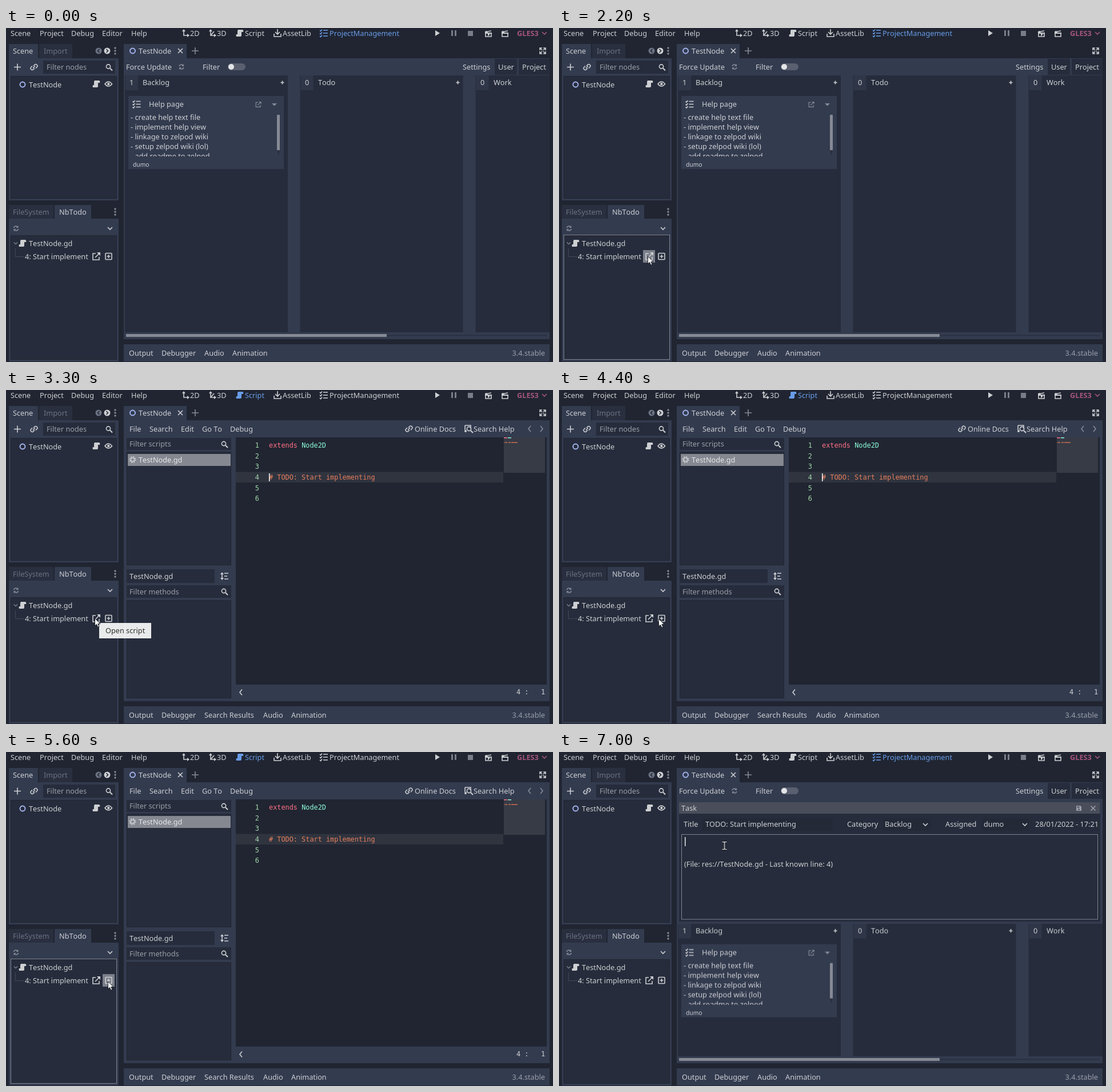
Animation of 957x585 px, one loop 8 s. Source, as an HTML page:

```html
<!DOCTYPE html>
<html lang="en">
<head>
<meta charset="utf-8">
<title>Editor todo list</title>
<style>
html, body { margin: 0; width: 100%; height: 100%; overflow: hidden; background: #202531; }
svg { display: block; color: #cdcfd2; }
text { font: 12.72px "Noto Sans", sans-serif; font-kerning: none; fill: currentColor; white-space: pre; }
.code text { font: 11.87px "DejaVu Sans Mono", monospace; }
.small { font-size: 10.3px; }
.bold { font-weight: 700; }
.end { text-anchor: end; }
.dim { color: #9a9fa9; }
.faint { color: #858a95; }
.off { color: #6b7282; }
.num { color: #a3d6a9; }
.base { fill: #333b4f; }
.well { fill: #262c3b; }
.tab { fill: #292f3e; }
.count { fill: #2f3648; }
.line { fill: none; stroke: currentColor; stroke-width: 1.6; }
.solid { fill: currentColor; }
.focus { fill: none; stroke: #7f8490; }

/* one loop is 8 s, so 100 ms = 1.25% */
.anim { animation: 8s step-end infinite; }
.board-view { animation-name: board-view; }
.script-view { animation-name: script-view; }
.board-tab { animation-name: board-tab; }
.script-tab { animation-name: script-tab; }
.task { animation-name: task; }
.board { animation-name: board; }
.tree-focus { animation-name: tree-focus; }
.press-open { animation-name: press-open; }
.press-add { animation-name: press-add; }
.tip-open { animation-name: tip-open; }
.tip-add { animation-name: tip-add; }
.caret { animation-name: caret; }
.edit { animation-name: edit; }
.mouse { animation-name: mouse; }
.arrow { animation-name: arrow; }
.beam { animation-name: beam; }
@keyframes board-view { 0%, 71.25% { opacity: 1 } 30% { opacity: 0 } }
@keyframes script-view { 0%, 71.25% { opacity: 0 } 30% { opacity: 1 } }
@keyframes board-tab { 0%, 71.25% { color: #699ce8 } 30% { color: #cdcfd2 } }
@keyframes script-tab { 0%, 71.25% { color: #cdcfd2 } 30% { color: #699ce8 } }
@keyframes task { 0% { opacity: 0 } 71.25%, 100% { opacity: 1 } }
@keyframes board { 0% { transform: none } 71.25%, 100% { transform: translateY(217.6px) } }
@keyframes tree-focus { 0%, 30%, 87.5%, 100% { opacity: 0 } 27.5%, 70% { opacity: 1 } }
@keyframes press-open { 0%, 30%, 100% { opacity: 0 } 27.5% { opacity: 1 } }
@keyframes press-add { 0%, 71.25%, 100% { opacity: 0 } 70% { opacity: 1 } }
@keyframes tip-open { 0%, 52.5%, 100% { opacity: 0 } 36.25% { opacity: 1 } }
@keyframes tip-add { 0%, 70%, 100% { opacity: 0 } 67.5% { opacity: 1 } }
@keyframes caret {
  0%, 41.25%, 52.5%, 63.75% { opacity: 1 }
  35%, 46.25%, 58.75%, 70%, 100% { opacity: 0 }
}
@keyframes edit { 0% { opacity: 0 } 87.5%, 100% { opacity: 1 } }
@keyframes arrow { 0%, 80%, 100% { opacity: 0 } 6.25% { opacity: 1 } }
@keyframes beam { 0% { opacity: 0 } 80%, 100% { opacity: 1 } }
@keyframes mouse {
  0%, 6.25% { transform: translate(905px, 98px) }
  7.5% { transform: translate(850px, 118px) }
  8.75% { transform: translate(742px, 159px) }
  10% { transform: translate(590px, 215px) }
  11.25% { transform: translate(430px, 275px) }
  12.5% { transform: translate(300px, 324px) }
  13.75% { transform: translate(215px, 356px) }
  15% { transform: translate(165px, 374px) }
  16.25% { transform: translate(144px, 382px) }
  17.5% { transform: translate(146px, 387px) }
  18.75% { transform: translate(149px, 392px) }
  20% { transform: translate(152px, 396px) }
  21.25% { transform: translate(154px, 398px) }
  22.5% { transform: translate(155px, 400px) }
  47.5% { transform: translate(156px, 400px) }
  52.5% { transform: translate(160px, 400px) }
  53.75% { transform: translate(168px, 401px) }
  55% { transform: translate(174px, 401px) }
  56.25% { transform: translate(176px, 401px) }
  61.25% { transform: translate(177px, 402px) }
  63.75% { transform: translate(178px, 402px) }
  76.25% { transform: translate(184px, 390px) }
  77.5% { transform: translate(208px, 350px) }
  78.75% { transform: translate(248px, 298px) }
  80% { transform: translate(286px, 244px) }
  81.25% { transform: translate(303px, 203px) }
  82.5% { transform: translate(297px, 176px) }
  83.75%, 100% { transform: translate(289.5px, 164px) }
}
</style>
</head>
<body>
<svg width="957" height="585" viewBox="0 0 957 585">
<defs>
  <!-- icons are centred on 0,0 -->
  <g id="script"><path class="solid" d="M-3-6h8q2 1 1 4h-3v6q0 2-2 2h-7q-1-2 0-4h2v-5q0-2 1-3z"/></g>
  <path id="link" class="line" d="M-1-2l2-2q2-2 4 0t0 4l-2 2M1 2l-2 2q-2 2-4 0t0-4l2-2M-2 2l4-4"/>
  <g id="find" class="line"><circle cx="-1" cy="-1" r="3.6"/><path d="M2 2l4 4" stroke-width="2"/></g>
  <path id="plus" class="line" d="M-6 0H6M0-6V6"/>
  <path id="tiny-plus" class="line" stroke-width="1.2" d="M-3 0H3M0-3V3"/>
  <path id="cross" class="line" d="M-4-4l8 8M4-4l-8 8"/>
  <path id="down" class="line" d="M-4-2L0 2L4-2"/>
  <path id="left" class="line" d="M2-5L-2 0L2 5"/>
  <path id="right" class="line" d="M-2-5L2 0L-2 5"/>
  <g id="dots" class="solid"><circle cy="-5" r="1.7"/><circle r="1.7"/><circle cy="5" r="1.7"/></g>
  <g id="reload"><path class="line" stroke-width="1.2" d="M-4-1Q-3-4 0-4L3-3M4 1Q3 4 0 4L-3 3"/><path class="solid" d="M4-5v4h-4zM-4 5v-4h4z"/></g>
  <g id="open"><path class="line" stroke-width="1.9" d="M-1-5h-5v11h11v-5M5-5L-2 2"/><path class="solid" d="M1-7h6v6z"/></g>
  <g id="add" class="line"><rect x="-5.5" y="-5.5" width="11" height="11" rx="1"/><path d="M-3 0H3M0-3V3"/></g>
  <path id="list" class="line" d="M-1-5h8M-1 0h8M-1 5h8M-7-5l1.5 1.5L-3-6.5M-7 0l1.5 1.5L-3-1.5M-7 5l1.5 1.5L-3 3.5"/>
  <g id="axes"><path class="line" d="M-3-4v8h7"/><path class="solid" d="M-6-3L-3-7L0-3zM3 1l4 3-4 3z"/></g>
  <g id="save"><path class="solid" fill-rule="evenodd" d="M-4.500-4.500h7l2 2v7h-9zM-3-3v2h4v-2zM-1.500 1v2h3v-2z"/></g>
  <g id="movie"><path class="line" d="M-5-1v6H5v-6zM-5-3L5-5"/><path class="solid" d="M-6-4l3-1 2 3h7v2H-6z"/></g>
  <g id="node"><circle r="4.5" fill="none" stroke="#a5b7f3" stroke-width="1.9"/></g>
  <g id="column">
    <rect class="well" width="285" height="450"/>
    <rect class="count" x="1" width="22" height="26"/>
  </g>
  <clipPath id="board-clip"><path d="M206 83H951V533H206z"/></clipPath>
  <clipPath id="note-clip"><path d="M215 148H472V225H215z"/></clipPath>
</defs>

<!-- top bar -->
<text x="8" y="13.5">Scene</text><text x="59" y="13.5">Project</text><text x="114" y="13.5">Debug</text>
<text x="168" y="13.5">Editor</text><text x="219" y="13.5">Help</text>
<use href="#axes" x="314" y="9"/><text x="322" y="13.5">2D</text>
<use href="#axes" x="361" y="9"/><path class="line" d="M358 13l6-7"/><text x="369" y="13.5">3D</text>
<g class="anim script-tab"><use href="#script" x="409" y="9"/><text x="418" y="13.5">Script</text></g>
<path class="line" d="M475 2v8M471 7l4 4 4-4M469 10v5h12v-5"/><text x="484" y="13.5">AssetLib</text>
<g class="anim board-tab"><use href="#list" x="556" y="9"/><text x="566" y="13.5">ProjectManagement</text></g>
<path class="solid" d="M751 4l8 5-8 5z"/>
<path fill="#777d89" d="M779 4h3v10h-3zM785 4h3v10h-3zM808 5h9v9h-9z"/>
<use href="#movie" x="844" y="10"/><path class="solid" d="M843 9l4 2.500-4 2.500z"/>
<use href="#movie" x="873" y="10"/>
<g color="#a5557d"><text class="bold" x="894" y="13.5">GLES3</text><use href="#down" x="942" y="9"/></g>

<!-- scene dock -->
<path class="base" d="M5 28h51v25h141v249H5z"/>
<path class="tab" d="M58 28h58v25H58z"/>
<text x="12" y="44.500">Scene</text><text class="off" x="66" y="44.500">Import</text>
<circle class="off solid" cx="162" cy="40" r="5.5"/><circle class="solid" cx="177" cy="40" r="5.5"/>
<g stroke="#202531" stroke-width="1.5" fill="none"><path d="M163.500 37l-3 3 3 3M175.500 37l3 3-3 3"/></g>
<use class="faint" href="#dots" x="191" y="40"/>
<use href="#plus" x="20" y="68.500"/><use href="#link" x="49" y="68.500"/>
<path class="well" d="M65 57h126v23H65z"/>
<text class="dim" x="71" y="73">Filter nodes</text><use href="#find" x="180" y="68.500"/>
<rect class="well" x="8.500" y="84.500" width="185" height="214" stroke="#202531"/>
<use href="#node" x="29" y="99"/><text x="40" y="103.500">TestNode</text>
<use href="#script" x="158" y="98"/>
<path class="line" d="M173 98q6-8 12.500 0q-6.500 8-12.500 0z"/><circle class="solid" cx="179.300" cy="98" r="2.2"/>

<!-- todo dock -->
<path class="tab" d="M5 310h78v24H5z"/>
<path class="base" d="M85 310h64v24h48v250H5v-250h80z"/>
<text class="off" x="12" y="326.500">FileSystem</text><text x="93" y="326.500">NbTodo</text>
<use class="faint" href="#dots" x="191" y="322"/>
<use class="faint" href="#reload" x="17.500" y="351"/><use href="#down" x="182" y="351"/>
<rect class="well" x="8.500" y="363.500" width="185" height="217" stroke="#202531"/>
<rect class="anim tree-focus focus" x="8.500" y="362.500" width="185" height="218"/>
<use class="faint" href="#down" transform="translate(17 377) scale(.8)"/>
<use href="#script" x="29" y="377"/><text x="40" y="381.500">TestNode.gd</text>
<path d="M16.500 386v14.500H32" fill="none" stroke="#414858"/>
<text x="33" y="404.500">4: Start implement</text>
<g fill="#7a7f8a">
  <path class="anim press-open" d="M147 389h21v22h-21z"/>
  <path class="anim press-add" d="M169 389h21v22h-21z"/>
</g>
<use href="#open" x="158" y="400"/><use href="#add" x="179.500" y="400"/>

<!-- main panel -->
<path class="base" d="M206 28h110v25h635v492H206zM206 554h745v30H206z"/>
<use href="#node" x="221.500" y="40"/><text x="232" y="44.500">TestNode</text>
<use href="#cross" x="305" y="40"/><use class="faint" href="#plus" x="331" y="40"/>
<path class="line" d="M934 39v-4h4M940 35h4v4M944 41v4h-4M938 45h-4v-4M935 36l3 3M943 36l-3 3M943 44l-3-3M935 44l3-3"/>
<text x="215" y="573.500">Output</text><text x="272" y="573.500">Debugger</text>
<text class="dim end" x="943" y="573.500">3.4.stable</text>

<g class="anim board-view">
  <text x="347" y="573.500">Audio</text><text x="396" y="573.500">Animation</text>
  <text x="210" y="72.5">Force Update</text><use class="faint" href="#reload" x="307" y="68"/>
  <text x="344" y="72.5">Filter</text>
  <rect x="388" y="62" width="31" height="12" rx="6" fill="#5a606f"/><circle cx="394" cy="68" r="5" fill="#e4e5e8"/>
  <text x="799" y="72.5">Settings</text>
  <path class="well" d="M855 54h39v28h-39zM897 54h54v28h-54z"/>
  <text x="861" y="72.5">User</text><text x="903" y="72.5">Project</text>

  <g clip-path="url(#board-clip)"><g class="anim board">
    <use href="#column" x="208" y="83"/><use href="#column" x="514.500" y="83"/><use href="#column" x="821.500" y="83"/>
    <text x="216" y="100">1</text><text x="239" y="100">Backlog</text><use href="#tiny-plus" x="483.500" y="95.500"/>
    <text x="523" y="100">0</text><text x="546" y="100">Todo</text><use href="#tiny-plus" x="790.500" y="95.500"/>
    <text x="830" y="100">0</text><text x="853" y="100">Work</text>
    <path class="base" d="M214 119h272v128H214z"/>
    <use href="#list" x="228.500" y="133.500"/><text x="250" y="138">Help page</text>
    <g class="faint"><use href="#open" transform="translate(441.500 134) scale(.72)"/><path class="solid" d="M465 132h9l-4.500 4.500z"/></g>
    <g clip-path="url(#note-clip)">
      <text x="218" y="161">- create help text file</text>
      <text x="218" y="178">- implement help view</text>
      <text x="218" y="195">- linkage to zelpod wiki</text>
      <text x="218" y="212">- setup zelpod wiki (lol)</text>
      <text x="218" y="229">- add readme to zelpod</text>
    </g>
    <rect x="475" y="152" width="3" height="69" fill="#2a3041"/>
    <rect x="474" y="152" width="5" height="62" rx="1" fill="#868a94"/>
    <text class="small" x="222" y="242.500">dumo</text>
  </g></g>
  <rect x="210" y="537" width="736" height="3" fill="#2c3345"/>
  <rect x="210" y="536" width="456" height="5" rx="1" fill="#868a94"/>

  <g class="anim task">
    <path class="base" d="M206 83h745v218H206z"/>
    <path class="well" d="M210 107h737v190H210z"/>
    <path fill="#494e5a" d="M210 88h736v20H210z"/>
    <text x="214" y="102.500">Task</text>
    <use class="dim" href="#save" x="909.500" y="98.500"/><use class="dim" href="#cross" x="934.500" y="98.500"/>
    <path fill="#232937" d="M250 116h229v22H250zM566 116h84v22h-84zM739 116h84v22h-84z"/>
    <text x="218" y="131">Title</text><text x="256" y="131">TODO: Start implementing</text>
    <text x="504" y="131">Category</text><text x="570" y="131">Backlog</text><use href="#down" x="641" y="127"/>
    <text x="676" y="131">Assigned</text><text x="743" y="131">dumo</text><use href="#down" x="815" y="127"/>
    <text class="end" x="944" y="131">28/01/2022 - 17:21</text>
    <rect x="214.500" y="144.500" width="728" height="148" fill="none" stroke="#222836"/>
    <text x="219" y="200.500">(File: res://TestNode.gd - Last known line: 4)</text>
    <g class="anim edit">
      <rect class="focus" x="214.500" y="144.500" width="728" height="148.500"/>
      <path fill="#e8e9eb" d="M220 149h1.500v16H220z"/>
    </g>
  </g>
</g>

<g class="anim script-view">
  <text x="347" y="573.500">Search Results</text><text x="450" y="573.500">Audio</text><text x="499" y="573.500">Animation</text>
  <text x="216" y="72.5">File</text><text x="251" y="72.5">Search</text><text x="306" y="72.5">Edit</text>
  <text x="343" y="72.5">Go To</text><text x="392" y="72.5">Debug</text>
  <use href="#link" x="705" y="68"/><text x="715" y="72.5">Online Docs</text>
  <path class="line" d="M803 62h10v5M803 62v8"/><use href="#find" x="811" y="69"/><circle class="solid" cx="804" cy="72" r="2"/>
  <text x="818" y="72.5">Search Help</text>
  <g class="faint"><use href="#left" x="916" y="68"/><use href="#right" x="937" y="68"/></g>
  <path class="well" d="M211 84h183v21H211zM211 314h154v24H211zM211 342h183v22H211z"/>
  <g class="well" stroke="#202531"><path d="M211.500 108.500h182v198h-182zM211.500 368.500h182v171h-182z"/></g>
  <text class="dim" x="216" y="99">Filter scripts</text><use href="#find" x="382" y="95"/>
  <path fill="#858891" d="M213 112h180v21H213z"/>
  <circle class="line" cx="221.500" cy="122" r="3.300" stroke-width="2.500"/>
  <circle class="line" cx="221.500" cy="122" r="5.200" stroke-width="2" stroke-dasharray="2.040 2.040"/>
  <text x="232" y="126.500" color="#e6e7e9">TestNode.gd</text>
  <text x="216" y="330.500">TestNode.gd</text>
  <path class="line" d="M378 321v10M382 321h7M382 326h5M382 331h7"/><path class="solid" d="M375 323l3-4 3 4zM375 329l3 4 3-4z"/>
  <text class="dim" x="216" y="357.500">Filter methods</text><use href="#find" x="382" y="353"/>

  <path fill="#202531" d="M402 83h544v433H402z"/>
  <path fill="#2f343f" d="M402 143.500h468v18.500H402z"/>
  <path fill="#363b46" d="M871 83h72v62h-72z"/>
  <g fill="none" stroke-width="1.5">
    <path stroke="#ff7085" d="M871 83.700h6"/><path stroke="#8fffdb" d="M878 83.700h6"/>
    <path stroke="#cd6f51" d="M871 92h1M873 92h4M879 92h4M884 92h11"/>
  </g>
  <g class="code">
    <g class="num end">
      <text x="443" y="101">1</text><text x="443" y="119.700">2</text><text x="443" y="138.300">3</text>
      <text x="443" y="157">4</text><text x="443" y="175.700">5</text><text x="443" y="194.300">6</text>
    </g>
    <text x="460" y="101"><tspan fill="#ff7085">extends</tspan> <tspan fill="#8fffdb">Node2D</tspan></text>
    <text x="460" y="157" color="#e67e5c"># TODO: Start implementing</text>
    <text x="893" y="533">4 :</text><text x="936" y="533">1</text>
  </g>
  <path class="anim caret" fill="#fff" d="M460 146h1.500v14H460z"/>
  <use href="#left" x="411" y="529.500"/>
</g>

<!-- tooltips and pointer -->
<g class="anim tip-open">
  <path fill="#fff" fill-opacity=".9" d="M163 408h91v27h-91z"/><text x="174" y="426" color="#333130">Open script</text>
</g>
<g class="anim tip-add">
  <path fill="#fff" fill-opacity=".9" d="M186 409h91v27h-91z"/><text x="197" y="427" color="#333130">Create task</text>
</g>
<g class="anim mouse">
  <path class="anim arrow" fill="#fff" stroke="#15181f" stroke-width=".9" d="M.5 0V13L3.500 10.300L5.800 15.200L8 14.200L5.800 9.500H10z"/>
  <g class="anim beam" fill="none">
    <path stroke="#15181f" stroke-width="3" d="M-4-6.500h8M0-6.500v13M-4 6.500h8"/>
    <path stroke="#fff" stroke-width="1.2" d="M-4-6.500h3l1 1 1-1h3M0-5.500v11M-4 6.500h3l1-1 1 1h3"/>
  </g>
</g>
</svg>
</body>
</html>
```
